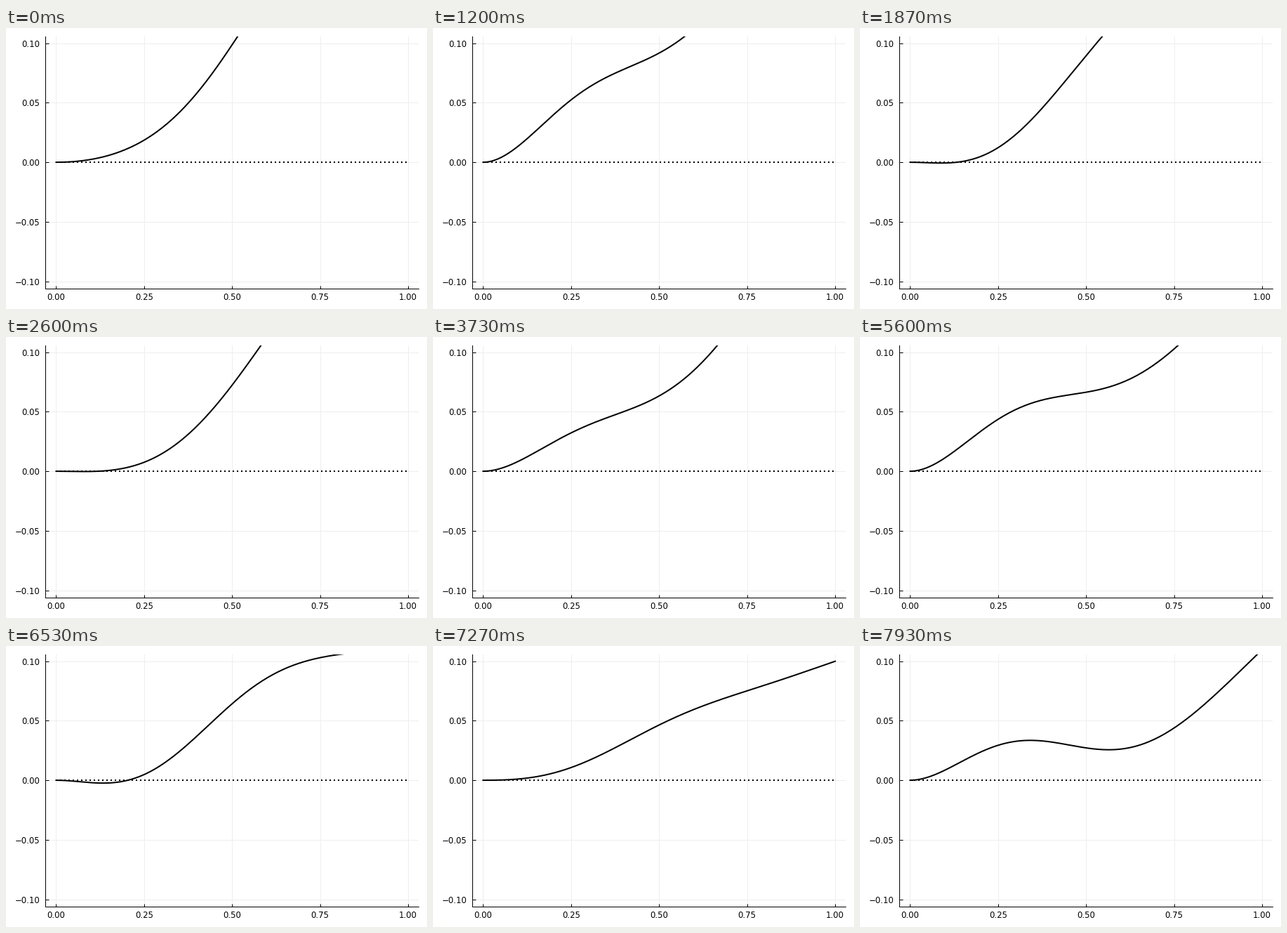
Recreate the animation shown at these times as a matplotlib script. Size 600 by 400 pixels, loop 8000 ms.

```python
import numpy as np
import matplotlib.pyplot as plt
from matplotlib.animation import FuncAnimation

W, H, DPI = 600, 400, 100
FRAMES, LOOP_MS = 120, 8000
PX = 72 / DPI

# Swinging clamped-free beam, one entry per bending mode
BETA = np.array([1.875104, 4.694091, 7.854757, 10.995541])  # wave number
AMP = np.array([0.1335, 0.0090, 0.0130, 0.0033])            # amplitude
OMEGA = np.array([0.165, 1.02, 2.81, 5.53])                 # rad/s
PEAK = np.array([0.35, 6.30, 5.64, 5.78])                   # time of a peak, s


def mode_shapes(x):
    """Deflection of each bending mode along the beam, one column per mode."""
    z = np.outer(x, BETA)
    s = (np.cosh(BETA) + np.cos(BETA)) / (np.sinh(BETA) + np.sin(BETA))
    return np.cosh(z) - np.cos(z) - s * (np.sinh(z) - np.sin(z))


X = np.linspace(0, 1, 201)
SHAPES = mode_shapes(X)


def deflection(t):
    return SHAPES @ (AMP * np.cos(OMEGA * (t - PEAK)))


plt.rcParams["font.family"] = "DejaVu Sans"
fig = plt.figure(figsize=(W / DPI, H / DPI), dpi=DPI, facecolor="white")
ax = fig.add_axes([56.4 / W, 1 - 370.7 / H, 531.8 / W, 359.2 / H])
ax.set_xlim(-0.03, 1.03)
ax.set_ylim(-0.106, 0.106)
ax.set_xticks(np.linspace(0, 1, 5))
ax.set_yticks(np.linspace(-0.1, 0.1, 5))
ax.xaxis.set_major_formatter("{x:.2f}")
ax.yaxis.set_major_formatter("{x:.2f}")
ax.set_axisbelow(True)
ax.grid(color="#eeeeee", lw=1 * PX)
ax.tick_params(direction="in", length=4.5 * PX, width=1 * PX, labelsize=11.6 * PX)
ax.tick_params(axis="x", pad=6 * PX)
ax.tick_params(axis="y", pad=8 * PX)
for side in ("top", "right"):
    ax.spines[side].set_visible(False)
for side in ("left", "bottom"):
    ax.spines[side].set_linewidth(1 * PX)

ax.plot([0, 1], [0, 0], color="black", lw=2 * PX, ls=(0, (1, 2)), dash_capstyle="butt")
beam, = ax.plot([], [], color="black", lw=2 * PX)


def update(i):
    beam.set_data(X, deflection(i * LOOP_MS / FRAMES / 1000))
    return beam,


anim = FuncAnimation(fig, update, frames=FRAMES, interval=LOOP_MS / FRAMES,
                     repeat=True, repeat_delay=0, blit=False)
plt.show()
```
